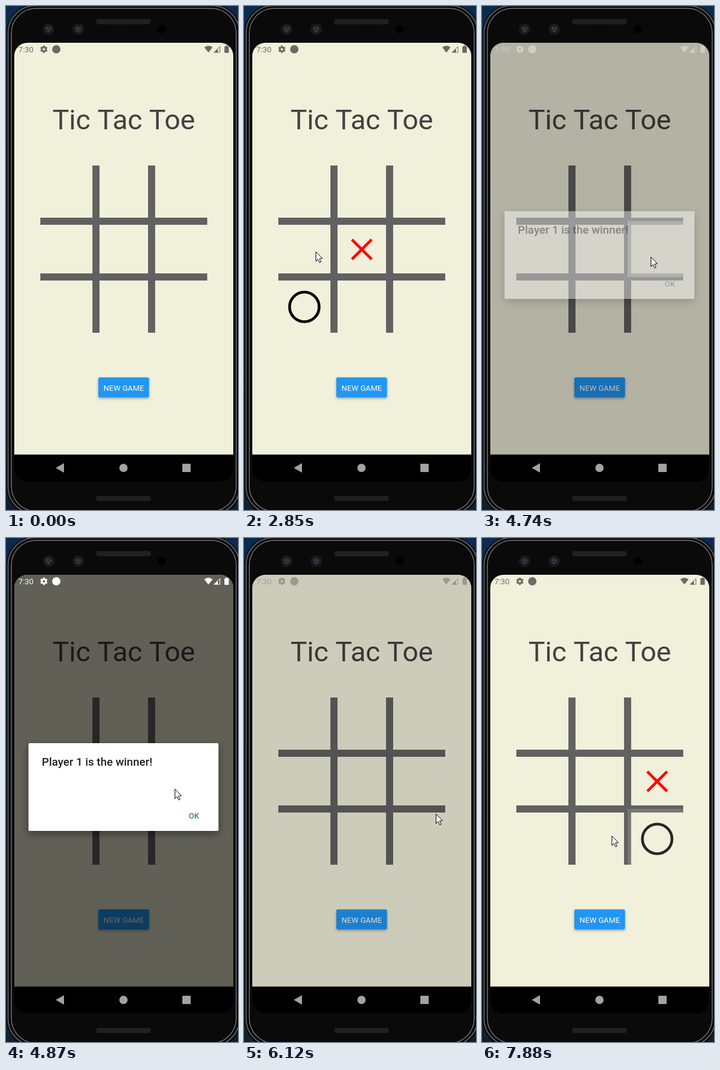
An HTML page with a canvas that plays this animation: 392x850 px, repeating every 8 s.

```html
<!DOCTYPE html>
<html lang="en">
<head>
<meta charset="utf-8">
<title>Tic Tac Toe</title>
<style>
html, body { margin: 0; width: 100%; height: 100%; overflow: hidden; background: #0a0a0a; }
canvas { display: block; width: 392px; height: 850px; }
</style>
</head>
<body>
<canvas id="stage"></canvas>
<script>
const W = 392, H = 850, LOOP = 8000;
const canvas = document.getElementById('stage');
const ctx = canvas.getContext('2d');
const ratio = window.devicePixelRatio || 1;
canvas.width = W * ratio;
canvas.height = H * ratio;

const DP = 0.942, CELL = 94, BORDER = 6;
const BOARD = { x: 58, y: 269 };
const PAPER = '#f1f0db', LINE = '#616161';
const FONT = 'Roboto, sans-serif';

const TICK = 125, PHASE = 25;
const TRAVEL = 250;                      // length of one pointer move
const PRESS = 150, RELEASE = 250;        // fading of a tapped cell
const WIN = 4660, RESET = 4700, CLOSE = 5890;

// Where the pointer goes: arrival, x, y and, for a tap, the moment of release.
const STOPS = [
  [350, 305, 494], [725, 187, 420, 1170], [1475, 147, 498], [1980, 112, 510, 2200],
  [2480, 155, 447], [2850, 121, 414, 3050], [3740, 229, 478, 3970], [4360, 285, 423, 4600],
  [5105, 254, 490], [5355, 324, 465], [6620, 308, 425, 6820], [6975, 309, 453],
  [7260, 300, 511, 7680], [7850, 219, 502]
];

const clamp = v => Math.max(0, Math.min(1, v));
const mix = (a, b, k) => a + (b - a) * k;
const easeInOut = p => p < 0.5 ? 2 * p * p : 1 - 2 * (1 - p) * (1 - p);

// A tap hits the cell under the pointer; X and O take turns in each round.
const taps = STOPS.filter(stop => stop[3]).map(([, x, y, time]) => ({
  time,
  round: time < RESET ? 0 : 1,
  col: Math.floor((x - BOARD.x) / CELL),
  row: Math.floor((y - BOARD.y) / CELL)
}));
taps.forEach(tap => {
  tap.mark = taps.filter(o => o.round === tap.round).indexOf(tap) % 2 ? 'O' : 'X';
});

function box(x, y, w, h, r, color) {
  ctx.beginPath();
  ctx.roundRect(x, y, w, h, r);
  ctx.fillStyle = color;
  ctx.fill();
}

function ring(x, y, w, h, r, color, width) {
  ctx.beginPath();
  ctx.roundRect(x, y, w, h, r);
  ctx.strokeStyle = color;
  ctx.lineWidth = width;
  ctx.stroke();
}

function disc(x, y, r, color) {
  ctx.beginPath();
  ctx.arc(x, y, r, 0, Math.PI * 2);
  ctx.fillStyle = color;
  ctx.fill();
}

function poly(points, color) {
  ctx.beginPath();
  points.forEach(([x, y]) => ctx.lineTo(x, y));
  ctx.closePath();
  ctx.fillStyle = color;
  ctx.fill();
}

function text(str, x, y, size, weight, color, align = 'left') {
  ctx.font = `${weight} ${size}px ${FONT}`;
  ctx.textAlign = align;
  ctx.fillStyle = color;
  ctx.fillText(str, x, y);
}

// The shadow is kept outside the box, so that it does not show through when fading.
function raisedBox(x, y, w, h, color, alpha, blur, dy) {
  ctx.save();
  ctx.beginPath();
  ctx.rect(0, 0, W, H);
  ctx.rect(x, y, w, h);
  ctx.clip('evenodd');
  ctx.shadowColor = `rgba(0,0,0,${alpha})`;
  ctx.shadowBlur = blur * ratio;
  ctx.shadowOffsetY = dy * ratio;
  box(x, y, w, h, 2, color);
  ctx.restore();
  box(x, y, w, h, 2, color);
}

function speaker(y) {
  box(152, y, 93, 9, 4, '#1b1b1b');
  for (let row = 0; row < 4; row++) {
    for (let x = 154 + row % 2; x < 243; x += 2) {
      ctx.fillStyle = '#303030';
      ctx.fillRect(x, y + 1 + row * 2, 1, 1);
    }
  }
}

function lens(x, y) {
  disc(x, y, 10, '#17191d');
  disc(x, y, 6, '#25282e');
  for (let i = 0; i < 3; i++) {
    const a = i * Math.PI * 2 / 3 + 3.8;
    disc(x + 3 * Math.cos(a), y + 3 * Math.sin(a), 1.4, '#484d54');
  }
}

function phone() {
  const desk = ctx.createLinearGradient(0, 0, 0, H);
  desk.addColorStop(0, '#0b2a4d');
  desk.addColorStop(1, '#10202e');
  ctx.fillStyle = desk;
  ctx.fillRect(0, 0, W, H);
  box(1, -3, 396, 863, 48, '#050505');
  ring(3.5, -0.5, 391, 857, 46, '#5e5e5e', 2);
  ring(9, 4, 380, 848, 42, '#777', 1.5);
  box(10, 5, 378, 846, 41, '#0a0a0a');
  speaker(22);
  speaker(826);
  lens(72, 39);
  lens(122, 39);
  disc(263, 39, 7, '#000');
}

function navBar() {
  ctx.fillStyle = '#000';
  ctx.fillRect(14, 756.5, 370, 46);
  const gray = '#a3a1a4';
  poly([[84, 779], [98, 771], [98, 787]], gray);
  disc(198.5, 779, 7, gray);
  box(298, 772, 14, 14, 1, gray);
}

function gear(x, y, color) {
  ctx.strokeStyle = color;
  ctx.lineWidth = 3;
  ctx.beginPath();
  ctx.arc(x, y, 3.4, 0, Math.PI * 2);
  ctx.stroke();
  ctx.beginPath();
  for (let i = 0; i < 6; i++) {
    const a = i * Math.PI / 3 + Math.PI / 6;
    const c = Math.cos(a), s = Math.sin(a);
    ctx.moveTo(x + 4 * c, y + 4 * s);
    ctx.lineTo(x + 6.2 * c, y + 6.2 * s);
  }
  ctx.stroke();
}

function statusBar(color, alpha) {
  if (alpha <= 0) return;
  ctx.save();
  ctx.globalAlpha = alpha;
  text('7:30', 21, 78, 14 * DP, 400, color);
  gear(64, 73, color);
  disc(85, 73, 7, color);
  ctx.beginPath();
  ctx.moveTo(342, 78.5);
  ctx.lineTo(335, 69.8);
  ctx.quadraticCurveTo(342, 64.2, 349, 69.8);
  ctx.fillStyle = color;
  ctx.fill();
  poly([[351, 78.5], [358, 71.5], [358, 78.5]], color);
  ctx.beginPath();
  ctx.moveTo(352, 78);
  ctx.lineTo(361.5, 68.5);
  ctx.lineTo(361.5, 78);
  ctx.closePath();
  ctx.strokeStyle = color;
  ctx.lineWidth = 1;
  ctx.stroke();
  box(369, 68, 7.5, 11, 1, color);
  box(371, 66.8, 3.5, 2, 0, color);
  ctx.restore();
}

function tapAlpha(age) {
  if (age < -PRESS || age > RELEASE) return 1;
  return age < 0
    ? mix(1, 0.2, easeInOut(1 + age / PRESS))
    : mix(0.2, 1, easeInOut(age / RELEASE));
}

function drawMark(mark, x, y) {
  ctx.beginPath();
  ctx.lineWidth = 5 * DP;
  if (mark === 'X') {
    const r = 16.7;
    ctx.moveTo(x - r, y - r);
    ctx.lineTo(x + r, y + r);
    ctx.moveTo(x + r, y - r);
    ctx.lineTo(x - r, y + r);
    ctx.strokeStyle = '#f00';
  } else {
    ctx.arc(x, y, 25, 0, Math.PI * 2);
    ctx.strokeStyle = '#000';
  }
  ctx.stroke();
}

function drawCell(col, row, t) {
  const x = BOARD.x + col * CELL, y = BOARD.y + row * CELL;
  const round = t < RESET ? 0 : 1;
  const hits = taps.filter(tap => tap.col === col && tap.row === row);
  const done = hits.find(tap => tap.round === round && tap.time <= t);

  ctx.save();
  ctx.globalAlpha = Math.min(1, ...hits.map(tap => tapAlpha(t - tap.time)));
  ctx.beginPath();
  if (col > 0) ctx.rect(x, y, BORDER, CELL);
  if (col < 2) ctx.rect(x + CELL - BORDER, y, BORDER, CELL);
  if (row > 0) ctx.rect(x, y, CELL, BORDER);
  if (row < 2) ctx.rect(x, y + CELL - BORDER, CELL, BORDER);
  ctx.fillStyle = LINE;
  ctx.fill();
  // Borders shift the centre of the content box in the outer cells.
  if (done) {
    drawMark(done.mark, x + CELL / 2 + (col - 1) * BORDER / 2, y + CELL / 2 + (row - 1) * BORDER / 2 + 0.5);
  }
  ctx.restore();
}

function game(t) {
  ctx.fillStyle = PAPER;
  ctx.fillRect(14, 62, 370, 695);
  text('Tic Tac Toe', 199, 208, 50 * DP, 400, '#414141', 'center');
  for (let row = 0; row < 3; row++) {
    for (let col = 0; col < 3; col++) drawCell(col, row, t);
  }
  raisedBox(156, 626.5, 85.5, 33.5, '#2196f3', 0.35, 4, 2);
  text('NEW GAME', 199, 648.5, 14 * DP, 400, '#fff', 'center');
}

function dialog(alpha) {
  if (alpha <= 0) return;
  ctx.save();
  ctx.globalAlpha = alpha;
  raisedBox(38, 346, 321, 148, '#fff', 0.4, 14, 5);
  text('Player 1 is the winner!', 60.5, 383.5, 19, 500, '#212121');
  text('OK', 317.5, 473, 14 * DP, 400, '#00695f', 'center');
  ctx.restore();
}

function pointer(t) {
  if (t < STOPS[0][0]) return;
  const next = STOPS.findIndex(stop => stop[0] > t);
  const to = STOPS.at(next), from = next > 0 ? STOPS[next - 1] : to;
  const k = clamp(1 - (to[0] - t) / TRAVEL);
  ctx.save();
  ctx.translate(Math.round(mix(from[1], to[1], k)) + 0.5, Math.round(mix(from[2], to[2], k)) + 0.5);
  poly([[0, 0], [0, 16], [3.6, 12.6], [6.2, 18.3], [8.6, 17.2], [6.1, 11.6], [11, 11.2]], '#fff');
  ctx.strokeStyle = '#000';
  ctx.lineWidth = 1;
  ctx.stroke();
  ctx.restore();
}

function draw(time) {
  const t = Math.floor((time + PHASE) / TICK) * TICK - PHASE;
  const opening = clamp((t - WIN) / 150);
  const shade = opening * (1 - clamp((t - CLOSE) / 280));
  const panel = opening * (1 - clamp((t - CLOSE) / 125));

  ctx.setTransform(ratio, 0, 0, ratio, 0, 0);
  phone();
  ctx.save();
  ctx.beginPath();
  ctx.roundRect(14, 62, 370, 740, 22);
  ctx.clip();
  game(t);
  navBar();
  ctx.fillStyle = `rgba(0,0,0,${0.6 * shade})`;
  ctx.fillRect(14, 62, 370, 695);
  statusBar('#6b6b65', clamp(1 - shade * 2));
  statusBar('#fff', panel);
  dialog(panel);
  ctx.restore();
  pointer(t);
}

const start = performance.now();
function tick() {
  draw((performance.now() - start) % LOOP);
  requestAnimationFrame(tick);
}
tick();
</script>
</body>
</html>
```
